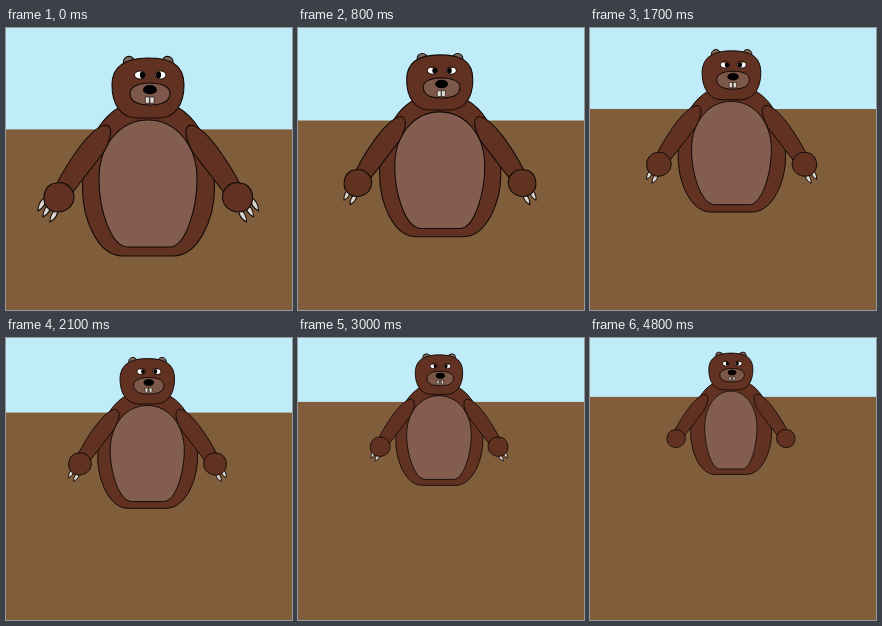
Recreate the animation shown at these times as an HTML page with a canvas. Size 286x282 px, loop 4900 ms.

```html
<!DOCTYPE html>
<html lang="en">
<head>
<meta charset="utf-8">
<title>Bear</title>
<style>
html, body { margin: 0; width: 100%; height: 100%; overflow: hidden; background: #805d3b; }
canvas { display: block; width: 286px; height: 282px; }
</style>
</head>
<body>
<canvas id="stage"></canvas>
<script>
const W = 286, H = 282, LOOP = 4900, STEP = 100;
const FUR = '#613121', SKIN = '#835d50', LINE = '#120a07';
const PIVOT = { x: 139, y: -8.5 };
const MIRROR = 284.5;
const canvas = document.getElementById('stage');
const ctx = canvas.getContext('2d');
const dpr = window.devicePixelRatio || 1;
canvas.width = W * dpr;
canvas.height = H * dpr;

// [time, value] keys
const ZOOM = [[0, 1], [600, .934], [800, .919], [1200, .889], [1400, .86],
  [1800, .799], [2100, .756], [2400, .715], [3000, .659], [3600, .613]];
const CLAWS = [[0, 1], [800, .96], [2100, .94], [3000, .88], [3600, .45]];
const OUTER_CLAW = [[0, 1], [700, .45]];
const BELLY_W = [[0, 1], [3000, 1], [3600, .87]];
const LIDS = [[0, 0], [800, .18], [3400, .25], [3600, .8], [3700, 1], [3800, 1], [4200, .2]];
const FANGS = [[0, 0], [1400, 0], [3000, 1]];

function track(keys, t) {
  for (let i = 1; i < keys.length; i++) {
    const [t0, a] = keys[i - 1], [t1, b] = keys[i];
    if (t <= t1) return a + (b - a) * (t - t0) / (t1 - t0);
  }
  return keys[keys.length - 1][1];
}

let lineW = 1;

function paint(path, fill) {
  ctx.fillStyle = fill;
  ctx.fill(path);
  ctx.strokeStyle = LINE;
  ctx.lineWidth = lineW;
  ctx.stroke(path);
}

const shape = d => new Path2D(d);

function oval(x, y, rx, ry = rx) {
  const p = new Path2D();
  p.ellipse(x, y, rx, ry, 0, 0, Math.PI * 2);
  return p;
}

const BODY = shape('M117 228C91 228 76.5 190 76.5 160C76.5 118 96 72 142.5 72C189 72 208.5 118 208.5 160C208.5 190 193 228 167 228Z');
const BELLY = shape('M122 219C105 219 93 182 93 151C93 117 114 92 142 92C170 92 191 117 191 151C191 182 179 219 164 219Z');
const HEAD = shape('M142 30C164 30 178 36 178 57C178 75 170 90 153 90L131 90C114 90 106 75 106 57C106 37 121 30 142 30Z');
const ARM = shape('M50 157C62 134 85 98 100 97C109 99 103 116 97 125L67 164Z');
const HAND = shape('M51 155C60 153 68 161 68 169C68 178 60 184 52 184C43 184 37 177 38 168C39 160 44 155 51 155Z');
const MUZZLE = shape('M144 55C156 55 164 59 164 65C164 73 157 77 144 77C131 77 124 73 124 65C124 59 132 55 144 55Z');

// tip is relative to the hand; grow below .5 hides the claw behind it
function claw(x, y, grow) {
  const rootX = 53 + x + 8, rootY = 169 + y - 14;
  const dx = 53 + x * grow - rootX, dy = 169 + y * grow - rootY;
  const n = Math.hypot(dx, dy) || 1;
  const px = -dy / n * 5, py = dx / n * 5;
  const mx = rootX + dx * .5, my = rootY + dy * .5;
  const p = new Path2D();
  p.moveTo(rootX, rootY);
  p.quadraticCurveTo(mx + px, my + py, rootX + dx, rootY + dy);
  p.quadraticCurveTo(mx - px, my - py, rootX, rootY);
  paint(p, '#d9d4cd');
}

function limb(t) {
  const grow = track(CLAWS, t), outer = track(OUTER_CLAW, t);
  paint(ARM, FUR);
  if (outer > .5) claw(-21, 14, outer);
  if (grow > .5) {
    claw(-16, 20, grow);
    claw(-9, 25, grow);
  }
  paint(HAND, FUR);
}

function eye(x, pupil, lid, side) {
  const y = 47, p = oval(x, y, 5.5, 4);
  ctx.save();
  ctx.clip(p);
  ctx.fillStyle = '#fff';
  ctx.fill(p);
  ctx.fillStyle = '#000';
  ctx.fill(oval(pupil, y, 2.6, 3.4));
  if (lid > 0) {
    const edge = y - 4.5 + lid * 10, slant = lid < 1 ? Math.min(lid * 6, 1) * side : 0;
    ctx.fillStyle = FUR;
    ctx.beginPath();
    ctx.moveTo(x - 7, y - 7);
    ctx.lineTo(x + 7, y - 7);
    ctx.lineTo(x + 7, edge + slant);
    ctx.lineTo(x - 7, edge - slant);
    ctx.fill();
  }
  ctx.restore();
  ctx.strokeStyle = LINE;
  ctx.lineWidth = lineW * .8;
  ctx.stroke(p);
}

function tooth(x, fang) {
  const p = new Path2D(), tip = 2 - fang * 1.2;
  p.moveTo(x - 2.2, 69);
  p.lineTo(x + 2.2, 69);
  p.lineTo(x + tip, 75.3);
  p.lineTo(x - tip, 75.3);
  p.closePath();
  ctx.fillStyle = '#dfdbd5';
  ctx.fill(p);
  ctx.strokeStyle = LINE;
  ctx.lineWidth = lineW * .6;
  ctx.stroke(p);
}

function face(t) {
  paint(oval(123, 34, 5.6), '#806b60');
  paint(oval(161.5, 34, 5.6), '#806b60');
  paint(HEAD, FUR);
  const lid = track(LIDS, t), fang = track(FANGS, t);
  eye(134, 136.5, lid, 1);
  eye(154.5, 152.5, lid, -1);
  paint(MUZZLE, '#7d584a');
  tooth(141.4 - fang, fang);
  tooth(146 + fang, fang);
  ctx.fillStyle = '#000';
  ctx.fill(oval(144, 61.7, 7, 4.6));
}

function belly(width) {
  ctx.save();
  ctx.translate(142, 0);
  ctx.scale(width, 1);
  ctx.translate(-142, 0);
  paint(BELLY, SKIN);
  ctx.restore();
}

function draw(t) {
  const zoom = track(ZOOM, t);
  ctx.setTransform(dpr, 0, 0, dpr, 0, 0);
  ctx.fillStyle = '#c0ebf9';
  ctx.fillRect(0, 0, W, H);
  const horizon = PIVOT.y + (101.4 - PIVOT.y) * zoom;
  ctx.fillStyle = '#805d3b';
  ctx.fillRect(0, horizon, W, H - horizon);

  ctx.translate(PIVOT.x, PIVOT.y);
  ctx.scale(zoom, zoom);
  ctx.translate(-PIVOT.x, -PIVOT.y);
  ctx.lineJoin = 'round';
  lineW = 1.1 / Math.sqrt(zoom);

  paint(BODY, FUR);
  belly(track(BELLY_W, t));
  limb(t);
  ctx.save();
  ctx.translate(MIRROR, 0);
  ctx.scale(-1, 1);
  limb(t);
  ctx.restore();
  face(t);
}

const start = performance.now();
function tick() {
  const t = (performance.now() - start) % LOOP;
  draw(Math.floor(t / STEP) * STEP);
  requestAnimationFrame(tick);
}
tick();
</script>
</body>
</html>
```
